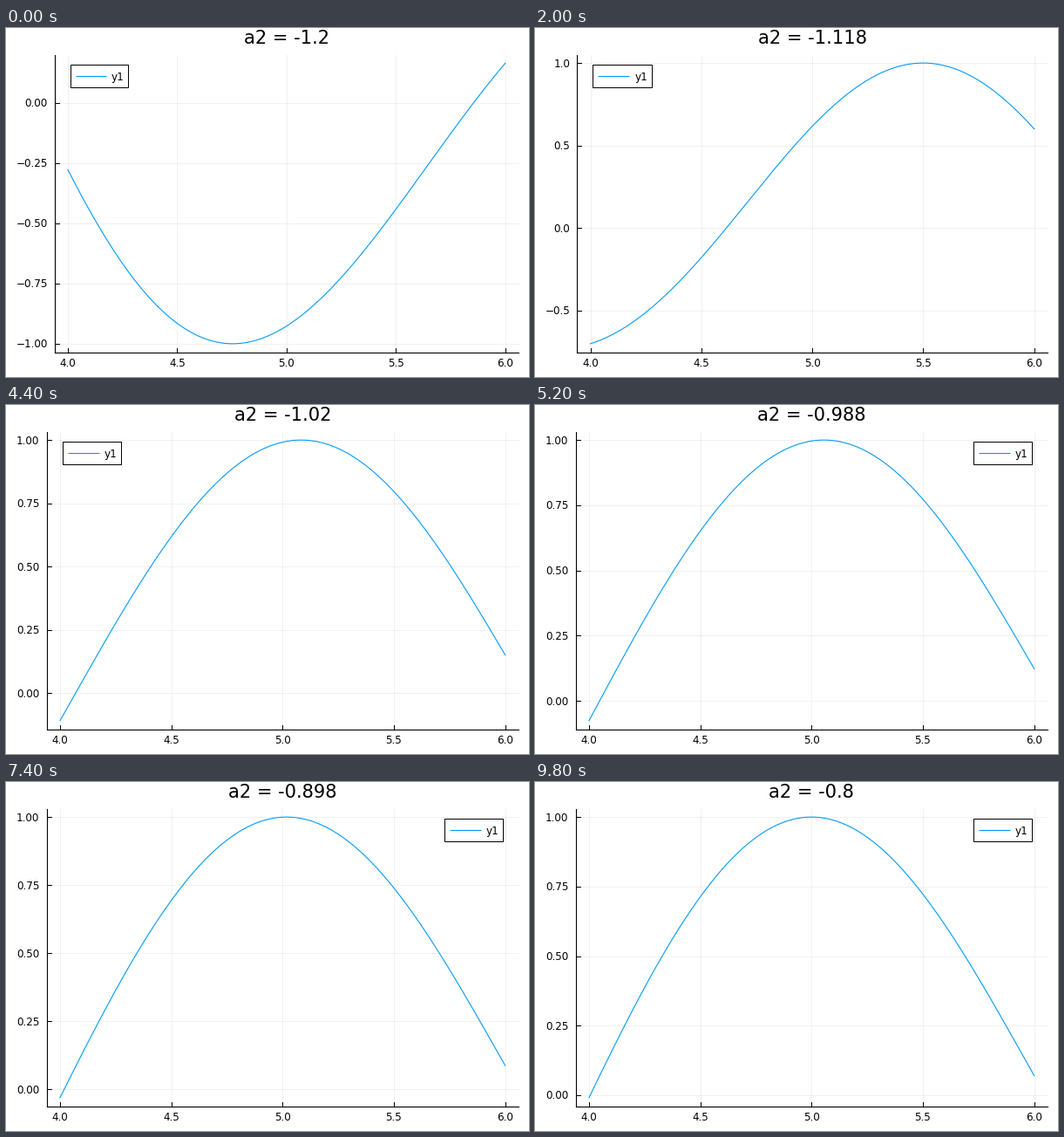
Animation of 600x400 px, one loop 10 s. Source, as a matplotlib script:

```python
import math

import matplotlib.pyplot as plt
import numpy as np
from matplotlib.animation import FuncAnimation
from matplotlib.patches import Rectangle

W, H, DPI = 600, 400, 100
FRAMES, INTERVAL = 50, 200
TOP, BOTTOM, RIGHT = 30.5, 371.5, 588
PAD = 0.03
PX = 72 / DPI
BLUE, RED = "#009afa", "#ff0000"
RED_STEP, LEGEND_SWITCH = 15, 26

# (step, niceness) pairs for choosing the y ticks; the earlier one wins a tie
STEPS = [(1.0, 1.0), (0.5, 0.9), (0.25, 0.5), (0.2, 0.7), (0.3, 0.2)]

plt.rcParams["font.family"] = "DejaVu Sans"
fig = plt.figure(figsize=(W / DPI, H / DPI), dpi=DPI, facecolor="white")
ax = fig.add_axes([0, 0, 1, 1])

xs = np.linspace(4, 6, 201)
d = xs - 5
even_mode = np.cos(1.54 * d) + 0.04 * d**3
odd_mode = (1 - 0.11 * d) * np.sin(2.015 * d)


def wave(a2):
    """Two modes mixed around a resonance, scaled to a peak of one."""
    gap = a2 + 1.133
    y = gap * even_mode + (0.0172 - 0.052 * gap) * odd_mode
    return y / np.abs(y).max()


def pick_ticks(lo, hi):
    best, ticks, digits = -1, [], 1
    for step, nice in STEPS:
        first, last = math.ceil(lo / step), math.floor(hi / step)
        n = last - first + 1
        if not 4 <= n <= 8:
            continue
        cover = 1.5 * (hi - lo) / ((n - 1) * step)
        score = (1 - abs(n - 5) / 5) / 4 + cover / 3 + nice / 4
        if score > best + 1e-9:
            best = score
            ticks = [k * step for k in range(first, last + 1)]
            digits = 2 if step == 0.25 else 1
    return ticks, digits


def line(x, y, color="black", width=1.0, **kw):
    ax.plot(x, y, color=color, lw=width * PX, **kw)


def text(x, y, s, size=12, ha="center"):
    ax.text(x, y, s, fontsize=size * PX, ha=ha, va="baseline", color="black")


def legend(left, color, on_right):
    width = RIGHT - left
    box_w, gap = width / 10 + 13.4, width / 90
    x = RIGHT - width / 30 + 0.4 - box_w if on_right else left + width / 30 + 0.2
    y = TOP + (BOTTOM - TOP) / 30
    ax.add_patch(Rectangle((x, y), box_w, 26.4, fc="white", ec="black",
                           lw=PX, zorder=4))
    start = x + gap
    end = start + width / 15
    line([start, end], [55, 55], color, width=1.1, zorder=5,
         solid_capstyle="butt")
    ax.text(end + gap - 0.2, 59.7, "y1", fontsize=12 * PX, ha="left",
            va="baseline", zorder=5)


def draw(i):
    ax.clear()
    ax.set_xlim(0, W)
    ax.set_ylim(H, 0)
    ax.axis("off")

    a2 = -1.2 + 0.4 * i / (FRAMES - 1)
    ys = wave(a2)
    margin = PAD * (ys.max() - ys.min())
    lo, hi = ys.min() - margin, ys.max() + margin
    ticks, digits = pick_ticks(lo, hi)
    left = 39 + 7.6 * (digits - 1) + (9.3 if ticks[0] < 0 else 0)

    def to_x(v):
        return left + (v - 4 + 2 * PAD) / (2 + 4 * PAD) * (RIGHT - left)

    def to_y(v):
        return BOTTOM - (v - lo) / (hi - lo) * (BOTTOM - TOP)

    for v in (4.0, 4.5, 5.0, 5.5, 6.0):
        x = to_x(v)
        line([x, x], [TOP, BOTTOM], alpha=0.055, zorder=1)
        line([x, x], [BOTTOM, BOTTOM - 5], zorder=3)
        text(x, 387.5, f"{v:.1f}")
    for v in ticks:
        y = to_y(v)
        line([left, RIGHT], [y, y], alpha=0.055, zorder=1)
        line([left, left + 5], [y, y], zorder=3)
        text(left - 8.2, y + 4.4, f"{v:.{digits}f}".replace("-", "\u2212"), ha="right")

    line([left, left], [TOP, BOTTOM], width=1.1, zorder=3)
    line([left, RIGHT], [BOTTOM, BOTTOM], width=1.1, zorder=3)

    color = RED if i == RED_STEP else BLUE
    line(to_x(xs), to_y(ys), color, width=1.1, zorder=3)
    legend(left, color, i >= LEGEND_SWITCH)
    text((left + RIGHT) / 2, 18.3, f"a2 = {round(a2, 3)}", size=21)
    return []


anim = FuncAnimation(fig, draw, frames=FRAMES, interval=INTERVAL,
                     init_func=lambda: [], repeat=True, repeat_delay=0)
plt.show()
```
